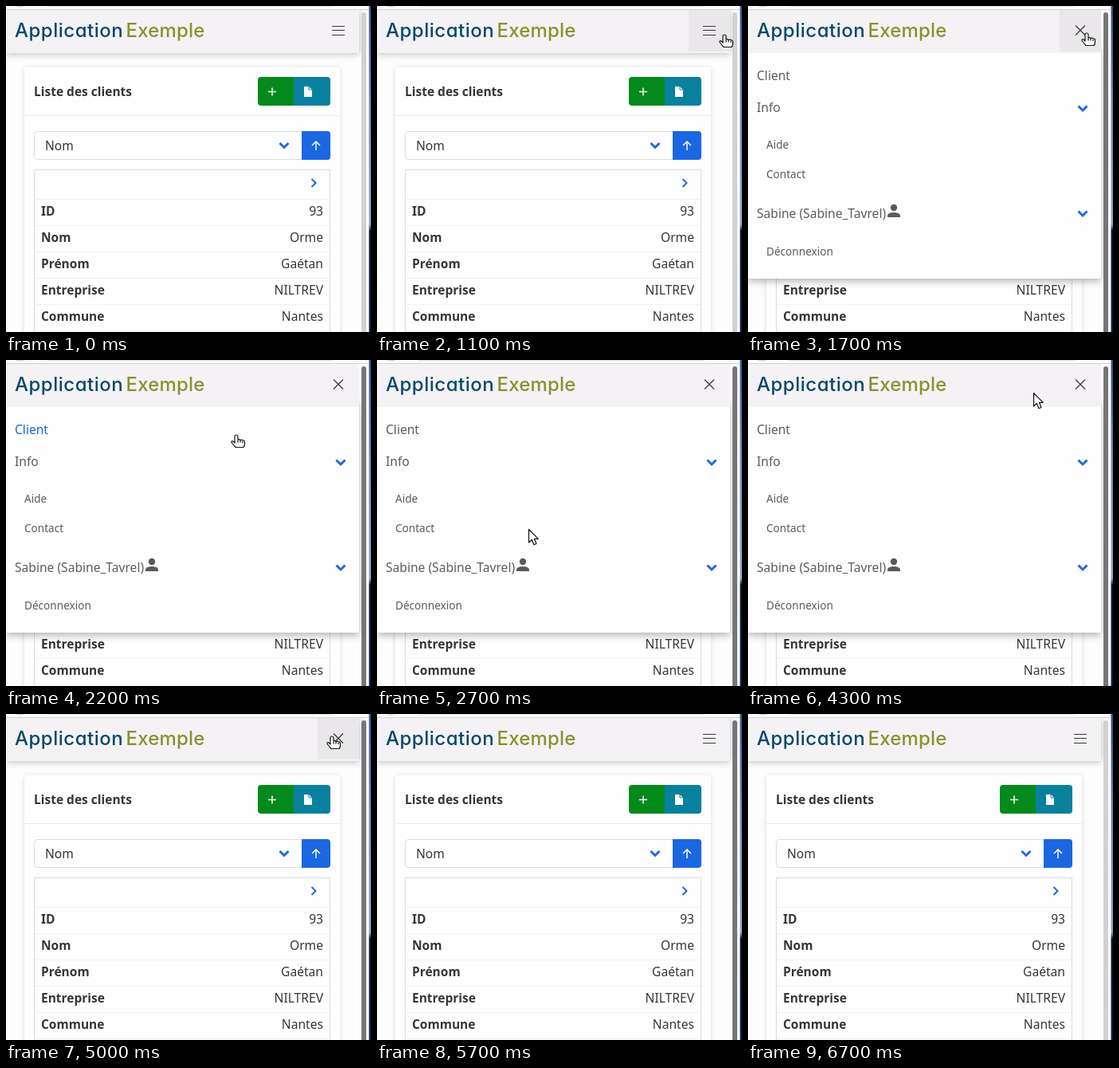
Recreate the animation shown at these times as an HTML page. Size 458x409 px, loop 6800 ms.

```html
<!DOCTYPE html>
<html lang="fr">
<head>
<meta charset="utf-8">
<title>Menu mobile</title>
<style>
  html, body { margin: 0; width: 100%; height: 100%; overflow: hidden; background: #fdfdfd; }
  svg { display: block; }
  text { font: 15.6px "Noto Sans", sans-serif; fill: #33373a; }
  .bold { font-size: 15.5px; font-weight: 700; }
  .end { text-anchor: end; }
  .brand { font: 500 24px Inter, sans-serif; font-feature-settings: "cv11"; letter-spacing: .5px; }
  .item { fill: #5c5c5c; }
  .sub { font-size: 13.6px; }
  .item.hover { fill: #1a66e0; }
  .line { fill: none; stroke: #dbdcde; }
  .blue { fill: none; stroke: #2268dc; stroke-width: 3; }
  .white { fill: none; stroke: #fff; stroke-width: 1.5; }
  .burger { fill: none; stroke: #383838; }
  .cursor { fill: #fff; stroke: #111; stroke-width: 1.2; stroke-linejoin: round; }
  .shadow { filter: drop-shadow(0 1px 4px #0004); }
  .deep { filter: drop-shadow(0 4px 5px #0004); }
</style>
</head>
<body>
<svg width="458" height="409" viewBox="0 0 458 409">
  <defs>
    <linearGradient id="wallpaper" x2="0" y2="1">
      <stop offset="0" stop-color="#2d5088"/>
      <stop offset=".3" stop-color="#6585ae"/>
      <stop offset=".67" stop-color="#8ba1bb"/>
      <stop offset=".69" stop-color="#07122b"/>
      <stop offset="1" stop-color="#0a1d40"/>
    </linearGradient>
  </defs>
  <rect width="458" height="409" fill="#fdfdfd"/>

  <g id="page">
    <rect x="23" y="77" width="396" height="350" fill="#fefefe" style="filter:drop-shadow(0 1px 3px #0a0a3a22)"/>
    <path d="M23 137.500H419" stroke="#e6e8ee"/>
    <text class="bold" x="35" y="113">Liste des clients</text>
    <path d="M361 89h-41a4 4 0 0 0-4 4v28a4 4 0 0 0 4 4h41z" fill="#048a1c"/>
    <path d="M361 89h42a4 4 0 0 1 4 4v28a4 4 0 0 1-4 4h-42z" fill="#0a809f"/>
    <path class="white" d="M329 107.500h10M334 102.500v10"/>
    <path d="M374 101h6l4 4v9h-10z" fill="#fff"/>
    <path d="M380 101v4h4" fill="none" stroke="#0a809f"/>
    <path class="line" d="M371 157.500h-331.500a4 4 0 0 0-4 4v27a4 4 0 0 0 4 4h331.500"/>
    <text x="49" y="181">Nom</text>
    <path class="blue" d="M343.500 172l5.500 5.500 5.500-5.500"/>
    <path d="M371 157h32a4 4 0 0 1 4 4v28a4 4 0 0 1-4 4h-32z" fill="#1b66e1"/>
    <path class="white" d="M389 181v-11M384 175l5-5 5 5"/>
    <path class="line" d="M35.500 409V205.500h371V409"/>
    <path class="blue" style="stroke-width:2" d="M383.500 217l5 5-5 5"/>
    <g id="rows"></g>
  </g>

  <g id="menu">
    <rect class="deep" y="50" width="443" height="292" fill="#fefefe"/>
    <g id="items"></g>
    <path class="blue" d="M414.500 125.500l5.500 5.500 5.500-5.500M414.500 257.500l5.500 5.500 5.500-5.500"/>
    <circle cx="183" cy="253" r="4.200" fill="#5a5a5a"/>
    <path d="M175 265v-2.500q1-3.500 8-3.500t8 3.500v2.500z" fill="#5a5a5a"/>
  </g>

  <rect id="header" y="5" width="443" height="54" fill="#f4f2f5"/>
  <rect id="buttonHover" x="391" y="5" width="52" height="52" fill="#e9e7ea"/>
  <text class="brand" x="11" y="38.500" style="fill:#05486b">Application</text>
  <text class="brand" x="150.500" y="38.500" style="fill:#84942a;letter-spacing:.2px">Exemple</text>
  <path id="bars" class="burger" d="M409 25.500h16M409 30.500h16M409 36.500h16"/>
  <path id="cross" class="burger" stroke-width="1.200" d="M411 24.500l12 12M411 36.500l12-12"/>

  <rect width="455" height="4" fill="#fafafa"/>
  <path d="M0 4.500H455" stroke="#d5d3d5"/>
  <path d="M13 0q5 2 10 0M52 0h358" fill="none" stroke="#ccc"/>
  <rect id="scrollbar" x="446" y="8" width="6" height="410" rx="3"/>
  <rect x="455.500" width="2.500" height="409" fill="url(#wallpaper)"/>

  <path id="arrow" class="cursor" d="M.5.5V17l3.800-3.500 2.700 6.300 3-1.300-2.700-6.200h5z"/>
  <g id="hand" class="cursor">
    <path d="M-3 1a2 2 0 0 1 4 0v4q2-1 3 .5 2-.8 3 .5 2.500-.5 2.500 2v2q0 3-1.500 4.500H-2Q-5 11-7 8.500q-.5-2.500 2-1.500l2 2z"/>
    <path d="M1 5.500v3M4 6v2.500M7 7v2" fill="none"/>
  </g>
</svg>
<script>
const LOOP = 6800, STEP = 100;
const MENU_OPEN = 1600, CROSS_ON = 1700, MENU_CLOSE = 5000, CROSS_OFF = 5100;
const SCROLL_DARK = 1600, SCROLL_LIGHT = 6700;

const $ = id => document.getElementById(id);

function addText(parent, content, x, y, className) {
  const text = document.createElementNS("http://www.w3.org/2000/svg", "text");
  text.setAttribute("x", x);
  text.setAttribute("y", y);
  text.setAttribute("class", className);
  text.textContent = content;
  parent.append(text);
  return text;
}

const client = [["ID", "93"], ["Nom", "Orme"], ["Prénom", "Gaétan"], ["Entreprise", "NILTREV"], ["Commune", "Nantes"]];
client.forEach(([label, value], i) => {
  const y = 263 + 33 * i;
  addText($("rows"), label, 44, y, "bold");
  addText($("rows"), value, 398, y, "end");
});
$("rows").insertAdjacentHTML("beforeend",
  [0, 1, 2, 3, 4, 5].map(i => `<path d="M36 ${242.5 + 33 * i}H406" stroke="#f1f1f3"/>`).join(""));

const items = Object.fromEntries([
  ["Client", 11, 93, ""],
  ["Info", 11, 133, ""],
  ["Aide", 23, 178.5, "sub"],
  ["Contact", 23, 215.5, "sub"],
  ["Sabine (Sabine_Tavrel)", 11, 266, ""],
  ["Déconnexion", 23, 312.5, "sub"],
].map(([label, x, y, size]) => [label, addText($("items"), label, x, y, "item " + size)]));

// Pointer positions: time, x, y, hovered element; each holds until the next.
const pointer = [
  [0], [700, 444, 382], [800, 420, 310], [900, 378, 195], [1000, 400, 95],
  [1100, 437, 37, "button"], [1200, 430, 36, "button"], [1300, 426, 35, "button"],
  [2000, 402, 46, "button"], [2100, 350, 70], [2200, 290, 95, "Client"], [2300, 240, 122, "Info"],
  [2400, 208, 148], [2500, 194, 168, "Aide"], [2600, 189, 185, "Aide"], [2700, 190, 212],
  [2900, 225, 238], [3000, 315, 278], [3100, 403, 307, "Déconnexion"],
  [3400, 406, 285], [3500, 407, 235], [3600, 406, 187, "Aide"],
  [3800, 402, 170, "Aide"], [3900, 394, 142, "Info"], [4000, 384, 112], [4100, 374, 85, "Client"],
  [4200, 364, 60], [4300, 358, 41], [4400, 375, 35], [4500, 395, 32, "button"], [4600, 410, 29, "button"],
  [5400, 320, 22], [5500, 232, 16], [5700],
];

const show = (id, visible) => $(id).setAttribute("visibility", visible ? "visible" : "hidden");
const between = (t, from, to) => t >= from && t < to;

function render(t) {
  const [, x, y, hover] = pointer.findLast(([start]) => t >= start);
  const menuOpen = between(t, MENU_OPEN, MENU_CLOSE);
  const crossed = between(t, CROSS_ON, CROSS_OFF);
  show("menu", menuOpen);
  show("bars", !crossed);
  show("cross", crossed);
  show("buttonHover", hover === "button");
  show("arrow", x !== undefined && !hover);
  show("hand", hover);
  for (const id of ["arrow", "hand"]) $(id).setAttribute("transform", `translate(${x ?? 0} ${y ?? 0})`);
  for (const label in items) items[label].classList.toggle("hover", label === hover);
  $("header").classList.toggle("shadow", !menuOpen);
  $("scrollbar").setAttribute("fill", between(t, SCROLL_DARK, SCROLL_LIGHT) ? "#77757a" : "#d2d0d2");
}

const start = performance.now();
function tick() {
  const elapsed = (performance.now() - start) % LOOP;
  render(Math.floor(elapsed / STEP) * STEP);
  requestAnimationFrame(tick);
}
tick();
</script>
</body>
</html>
```
